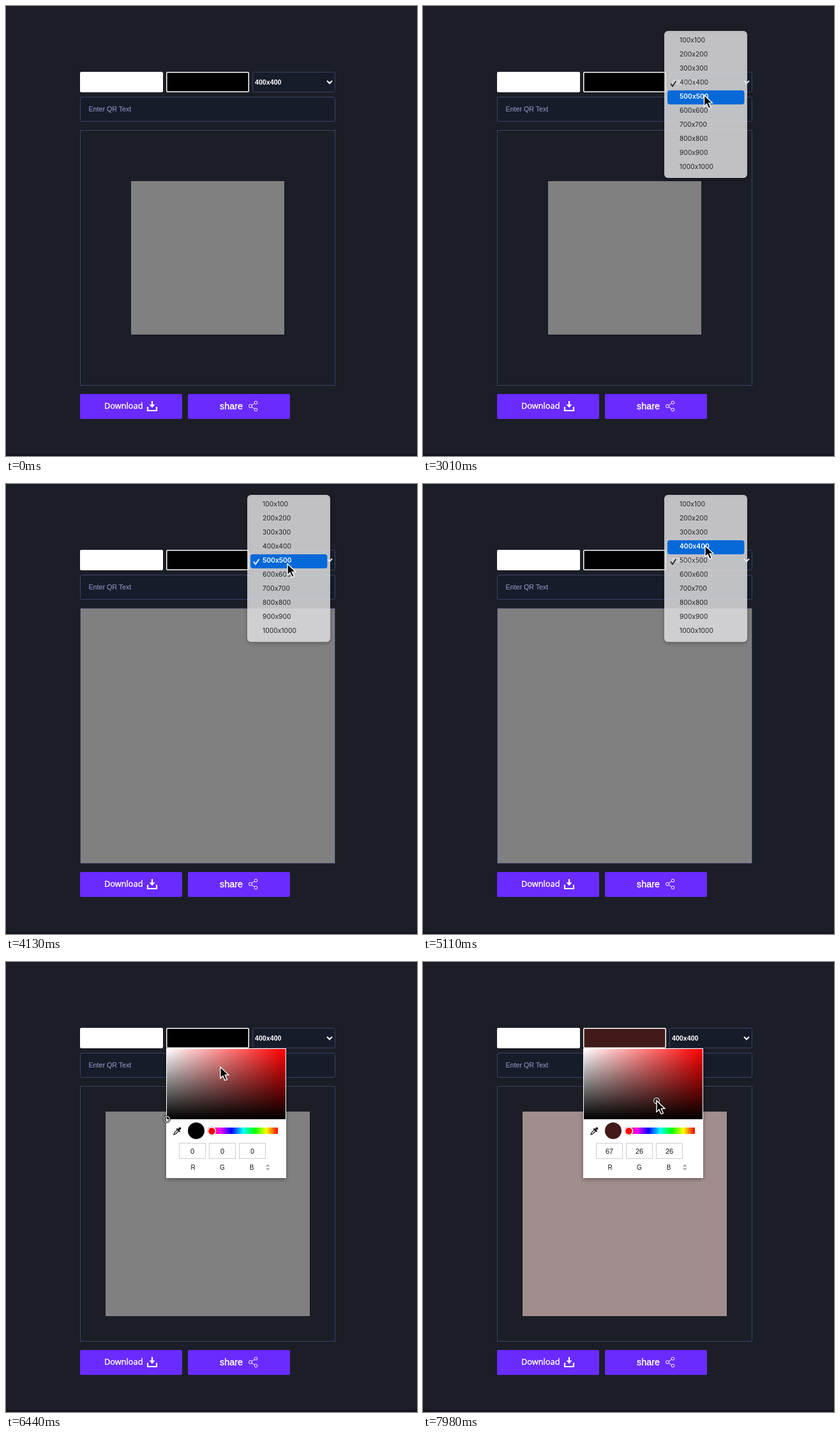
These frames come from a looping animation (644 by 704 pixels, 8000 ms). An HTML page:

```html
<!DOCTYPE html>
<html lang="en">
<head>
<meta charset="utf-8">
<title>Code generator</title>
<style>
  html, body { margin: 0; width: 100%; height: 100%; overflow: hidden; background: #15131d; }
  svg { display: block; width: 644px; height: 704px; font-family: "Liberation Sans", Arial, sans-serif; }
  .field { fill: #171c2a; stroke: #3d4067; }
  .button { fill: #6a2bff; }
  .line { fill: none; stroke: #fff; }
  .menu text { font: 10.3px Inter, sans-serif; fill: #232326; }
  .menu text.on { fill: #fff; font-weight: 600; }
  .picker text { text-anchor: middle; fill: #111; }
</style>
</head>
<body>
<svg viewBox="0 0 644 704">
  <defs>
    <linearGradient id="tint"><stop stop-color="#fff"/><stop offset="1" stop-color="#f00"/></linearGradient>
    <linearGradient id="shade" x2="0" y2="1"><stop stop-opacity="0"/><stop offset="1"/></linearGradient>
    <linearGradient id="hues">
      <stop stop-color="#f00"/><stop offset=".167" stop-color="#f0f"/><stop offset=".333" stop-color="#00f"/>
      <stop offset=".5" stop-color="#0ff"/><stop offset=".667" stop-color="#0f0"/>
      <stop offset=".833" stop-color="#ff0"/><stop offset="1" stop-color="#f00"/>
    </linearGradient>
    <filter id="shadow" x="-20%" y="-20%" width="140%" height="140%">
      <feDropShadow dx="0" dy="2" stdDeviation="3" flood-opacity=".35"/>
    </filter>
  </defs>

  <rect y="-1" width="644" height="702" rx="6" fill="#1b1e26"/>
  <rect x="116" y="103" width="130" height="32" rx="2" fill="#fff"/>
  <rect id="swatch" x="251.75" y="103.75" width="128.5" height="30.5" rx="1.5" stroke="#fff" stroke-width="1.5"/>
  <rect class="field" x="386.5" y="103.5" width="129" height="31" rx="2"/>
  <text id="size" x="390" y="123" font-size="10.67" font-weight="bold" fill="#fff"></text>
  <path class="line" d="M503 117l4 4 4-4" stroke-width="2"/>
  <rect class="field" x="116.5" y="142.5" width="399" height="38" rx="2"/>
  <text x="129.5" y="165" font-size="10.67" fill="#898cba" stroke="#898cba" stroke-width=".2">Enter QR Text</text>

  <rect x="116.5" y="194.5" width="399" height="399" fill="none" stroke="#3d4067"/>
  <rect id="panel"/>

  <rect class="button" x="116" y="607" width="160" height="39" rx="2"/>
  <text x="154" y="630" fill="#fff" stroke="#fff" stroke-width=".4" style="font:12.8px 'Open Sans','Noto Sans',sans-serif">Download</text>
  <path class="line" d="M222 627v6h14v-6M229 618v8" stroke-width="2.2"/>
  <path d="M224.5 623.5h9l-4.5 5z" fill="#fff"/>
  <rect class="button" x="285" y="607" width="160" height="39" rx="2"/>
  <text x="335" y="631" font-size="14.4" fill="#fff" stroke="#fff" stroke-width=".4">share</text>
  <g class="line">
    <circle cx="391.5" cy="620.5" r="2.3"/><circle cx="383" cy="626" r="2.5"/><circle cx="391.5" cy="631.5" r="2.3"/>
    <path d="M385 624.7l4.5-3M385 627.3l4.5 3"/>
  </g>

  <g id="menu" class="menu">
    <rect x="378" width="130" height="230" rx="6" fill="#e4e4e7" fill-opacity=".8" filter="url(#shadow)"/>
    <rect id="bar" x="383" width="120.5" height="22" rx="4" fill="#0669d8"/>
    <path id="tick" d="M388 .5l3 4 5.5-8" fill="none" stroke-width="1.8"/>
    <g id="items"></g>
  </g>

  <g id="picker" class="picker">
    <rect x="251" y="135" width="188" height="203" fill="#fff" filter="url(#shadow)"/>
    <rect x="252" y="136" width="186" height="110" fill="url(#tint)"/>
    <rect x="252" y="136" width="186" height="110" fill="url(#shade)"/>
    <circle id="ring" r="4.5" fill="none" stroke="#111" stroke-width="3"/>
    <circle id="ringTop" r="4.5" fill="none" stroke="#ddd" stroke-width="1.3"/>
    <path d="M263 270l1-3 5-5 2 2-5 5z" fill="none" stroke="#111" stroke-width="1.2"/>
    <path d="M267.5 260.5l5 5M270 263l2.5-2.5" stroke="#111" stroke-width="2.2"/>
    <circle cx="272.3" cy="260.5" r="2" fill="#111"/>
    <circle id="sample" cx="298" cy="264" r="13"/>
    <rect x="317" y="259" width="109" height="10" rx="1" fill="url(#hues)"/>
    <circle cx="322.5" cy="264.5" r="6" fill="#f00" stroke="#fff" stroke-width="1.5"/>
    <circle cx="322.5" cy="264.5" r="7" fill="none" stroke="#999" stroke-width=".5"/>
    <g id="channels"></g>
    <path d="M408 320l2.2-2.2 2.2 2.2M408 322.5l2.2 2.2 2.2-2.2" fill="none" stroke="#222"/>
  </g>

  <path id="arrow" d="M0 0v17.5l4-3.7 3.1 7 3.300-1.400-3.100-6.900 5.500-.3z" fill="#000" stroke="#fff" stroke-width="1.4"/>
  <g id="beam" fill="none">
    <path d="M-4-9q4 0 4 3V6q0 3-4 3M4-9q-4 0-4 3V6q0 3 4 3M-2.5 3h5" stroke="#fff" stroke-width="3"/>
    <path d="M-4-9q4 0 4 3V6q0 3-4 3M4-9q-4 0-4 3V6q0 3 4 3M-2.5 3h5" stroke="#111"/>
  </g>
</svg>
<script>
  const LOOP = 8000, STEP = 70, PRESS = 6580;
  const $ = id => document.getElementById(id);
  const set = (id, attrs) => {
    for (const name in attrs) $(id).setAttribute(name, attrs[name]);
  };
  const show = (id, visible) => { $(id).style.display = visible ? "" : "none"; };
  const clamp = v => Math.max(0, Math.min(1, v));

  // Pointer stops: time, x, y
  const path = [
    [70, 270, 664], [840, 414, 118], [1120, 341, 125], [1400, 408, 116], [1820, 408, 116],
    [2240, 430, 209], [2310, 430, 209], [2450, 432, 127], [2520, 432, 139.5],
    [2590, 432, 139.5], [2660, 440.5, 139.5],
    [3640, 440.5, 139.5], [3710, 444, 133], [3780, 443, 129], [3850, 443, 129],
    [4130, 441, 125], [4340, 441, 125], [4690, 440, 100], [4760, 440, 100], [4830, 442, 96],
    [5460, 442, 97], [5810, 359, 124.5], [5880, 350.5, 124.5], [6230, 350.5, 124.5],
    [PRESS, 328, 186], [7000, 327, 198], [7560, 350, 208], [7630, 350, 208], [7980, 366, 217]
  ];

  // Each opening of the size menu; it blinks, then fades from "pick" to "end"
  const menus = [
    { open: 1820, pick: 3010, end: 3220, y: 39, current: 3 },
    { open: 3920, pick: 5110, end: 5320, y: 17, current: 4 }
  ];

  const texts = Array.from({ length: 10 }, (_, i) => {
    const size = (i + 1) * 100;
    return `<text x="402" y="${18 + 22 * i}">${size}x${size}</text>`;
  });
  $("items").innerHTML = texts.join("");

  $("channels").innerHTML = ["R", "G", "B"].map((name, i) => `
    <rect x="${271.5 + 47 * i}" y="283.5" width="41" height="24" fill="#fff" stroke="#ccc"/>
    <text class="value" x="${292 + 47 * i}" y="300" font-size="11"></text>
    <text x="${293 + 46 * i}" y="325" font-size="10">${name}</text>`).join("");
  const values = document.querySelectorAll(".value");

  function pointerAt(t) {
    const next = path.findIndex(p => p[0] > t);
    if (next < 0) return path[path.length - 1].slice(1);
    const [t0, x0, y0] = path[Math.max(0, next - 1)];
    const [t1, x1, y1] = path[next];
    const k = clamp((t - t0) / (t1 - t0));
    const ease = k * k * (3 - 2 * k);
    return [x0 + (x1 - x0) * ease, y0 + (y1 - y0) * ease];
  }

  function drawMenu(t, y) {
    const menu = menus.find(m => t >= m.open && t < m.end);
    show("menu", menu);
    if (!menu) return false;
    const blink = t >= menu.pick - STEP && t < menu.pick;
    const row = blink ? -1 : Math.floor((y - menu.y - 5) / 22);
    set("menu", {
      transform: `translate(0 ${menu.y})`,
      opacity: 1 - clamp((t - menu.pick) / (menu.end - menu.pick))
    });
    show("bar", row >= 0);
    set("bar", { y: 5 + 22 * row });
    set("tick", {
      transform: `translate(0 ${16 + 22 * menu.current})`,
      stroke: row === menu.current ? "#fff" : "#222"
    });
    [...$("items").children].forEach((item, i) => item.classList.toggle("on", i === row));
    return true;
  }

  function drawColor(t, x, y) {
    const dragging = t >= PRESS;
    const px = dragging ? x : 252, py = dragging ? y : 246;
    const light = 255 * (1 - (py - 136) / 110);
    const dim = light * (1 - (px - 252) / 186);
    const rgb = [light, dim, dim].map(Math.round);
    const fill = `rgb(${rgb})`;
    set("swatch", { fill });
    set("sample", { fill });
    set("panel", { fill: `rgb(${rgb.map(c => Math.round((c + 255) / 2))})` });
    for (const id of ["ring", "ringTop"]) set(id, { cx: px, cy: py });
    values.forEach((value, i) => { value.textContent = rgb[i]; });
    const open = t >= 6090;
    show("picker", open);
    return open;
  }

  function render(time) {
    const t = Math.floor((time % LOOP) / STEP) * STEP;
    const [x, y] = pointerAt(t);
    const large = t >= 3220 && t < 5320;
    const side = t < 3220 ? 240 : large ? 398 : 320;
    $("size").textContent = large ? "500x500" : "400x400";
    set("panel", { x: 316 - side / 2, y: 394 - side / 2, width: side, height: side });

    const menuOpen = drawMenu(t, y);
    const pickerOpen = drawColor(t, x, y);
    const overInput = y >= 139 && y <= 181 && !menuOpen && !pickerOpen;
    show("arrow", t > 0 && !overInput);
    show("beam", overInput);
    set("arrow", { transform: `translate(${x} ${y})` });
    set("beam", { transform: `translate(${x} ${y + 1.5})` });
  }

  const start = performance.now();
  function tick() {
    render(performance.now() - start);
    requestAnimationFrame(tick);
  }
  render(0);
  requestAnimationFrame(tick);
</script>
</body>
</html>
```
